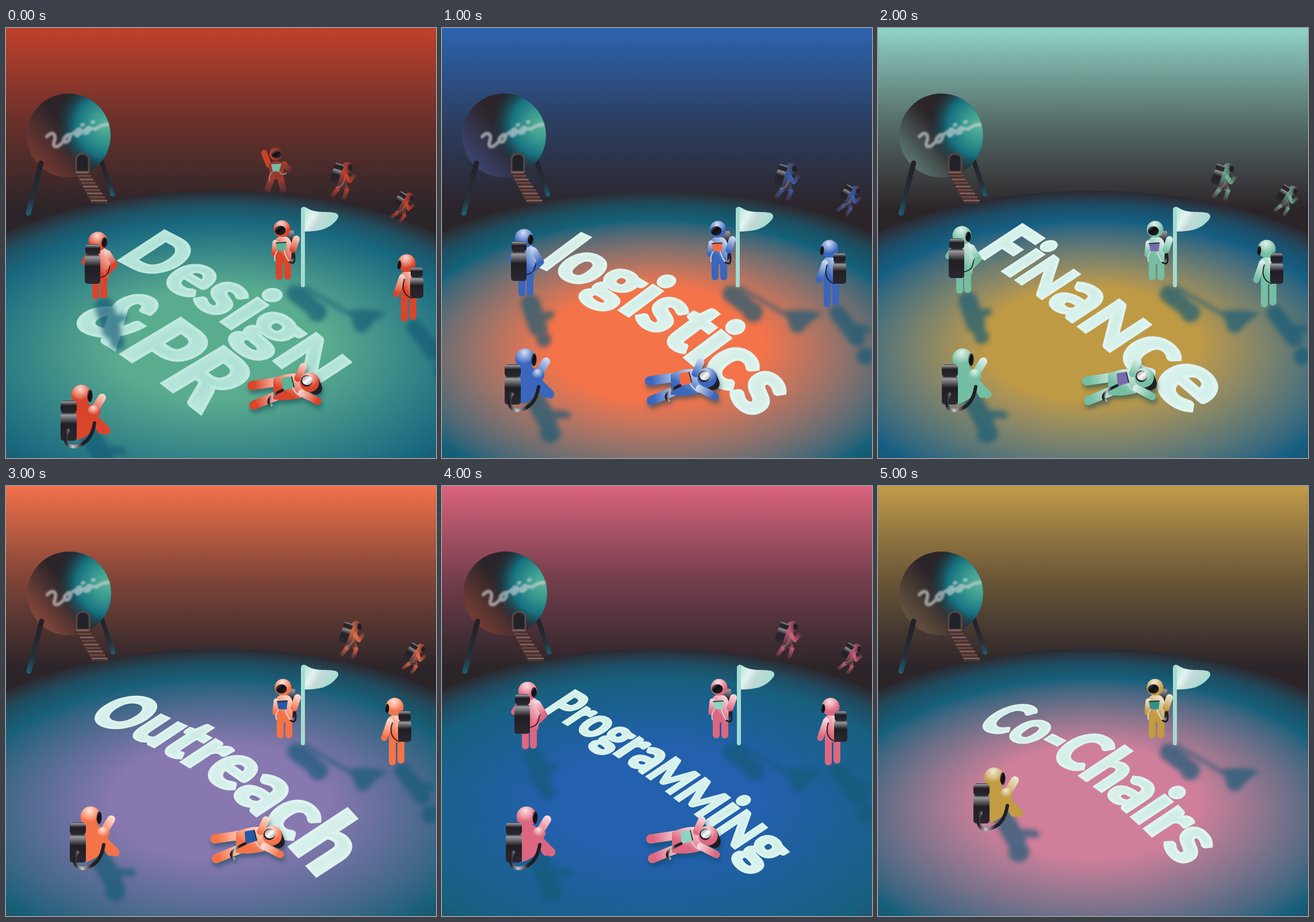
An HTML page that plays this animation: 748x748 px, repeating every 6 s.

```html
<!DOCTYPE html>
<html lang="en">
<head>
<meta charset="utf-8">
<title>Crew roles</title>
<style>
  html, body { margin: 0; height: 100%; overflow: hidden; background: #2b2429; }
  svg { display: block; width: 100vw; height: 100vh; }
  text { font: 900 100px Lato, "Open Sans", sans-serif; text-anchor: middle; stroke-width: 4; }
  .soft { filter: blur(4px); }
</style>
</head>
<body>
<svg id="stage" viewBox="0 0 748 748"></svg>
<script>
const STEP = 1000;
const DARK = '#2b2429';
const SHADE = '#145a76';

// Words: text, start, control and end of the baseline, cap-height vector, growth towards the end.
// Figures: offset from the usual place; a missing one is not on stage.
const scenes = [
  { sky: '#c1402a', ground: '#5aac8f', rim: '#17677f', suit: '#d9452b', panel: '#56b596', tint: '#7a3a32',
    glyph: ['#a9dfd2', '#bfe8de'], ship: [-1, 0], flag: [0, 0], holder: [-2, -1],
    back: [17, 5], right: [21, 25], sit: [-16, 63], lie: [65, 8], run: [[-16, -2], [-20, 12]], waver: [0, 0],
    words: [
      ['DesigN', [190, 402], [358, 482], [533, 636], [76, -50], 1.25],
      ['&', [108, 510], [148, 533], [188, 559], [106, -60], 1],
      ['PR', [193, 562], [268, 612], [338, 670], [100, -60], 1.06]] },
  { sky: '#2b64b0', ground: '#f57349', rim: '#13627a', suit: '#3a66bd', panel: '#f26a40', tint: '#3d4674',
    glyph: ['#d3ece6', '#dff4ef'], ship: [-2, 0], flag: [-2, 0], holder: [-2, 0],
    back: [0, 0], right: [-2, 0], sit: [-2, 0], lie: [-2, 0], run: [[-2, 0], [-2, 0]],
    words: [['logistics', [161, 411], [376, 508], [540, 683], [72, -54], 1.3]] },
  { sky: '#90d4c6', ground: '#bf9a45', rim: '#145f83', suit: '#74bfa4', panel: '#7a68ac', tint: '#5f7a74',
    glyph: ['#d0ede6', '#def4f0'], ship: [0, 0], flag: [0, 0], holder: [0, 0],
    back: [3, -5], right: [0, 0], sit: [0, 0], lie: [0, 0], run: [[0, 0], [0, 0]],
    words: [['FiNaNce', [167, 390], [325, 490], [538, 677], [76, -50], 1.3]] },
  { sky: '#f3714a', ground: '#8878b0', rim: '#17607a', suit: '#f47349', panel: '#2458a6', tint: '#8a4a3c',
    glyph: ['#cfebe5', '#def3ef'], ship: [0, 0], flag: [0, 0], holder: [0, 0],
    right: [0, 0], sit: [0, 0], lie: [0, 0], run: [[0, 0], [0, 0]],
    words: [['Outreach', [135, 406], [365, 474], [545, 684], [70, -46], 1.4]] },
  { sky: '#da637d', ground: '#2360ad', rim: '#17607f', suit: '#dc6781', panel: '#8fd3c5', tint: '#7a3f34',
    glyph: ['#d0eee7', '#dcf4ef'], ship: [0, 0], flag: [0, 0], holder: [0, 0],
    back: [6, -9], right: [0, 0], sit: [0, 0], lie: [0, 0], run: [[0, 0], [0, 0]],
    words: [['PrograMMiNg', [172, 390], [362, 490], [553, 671], [54, -36], 1.35]] },
  { sky: '#c19b49', ground: '#cf7f9a', rim: '#15607c', suit: '#c39b43', panel: '#2f9088', tint: '#6a5540',
    glyph: ['#cdebe4', '#def3ef'], ship: [0, 0], flag: [0, 0], holder: [0, 0], sit: [55, -68],
    words: [['Co-Chairs', [166, 419], [358, 470], [530, 665], [66, -44], 1.25]] }
];

const pen = document.createElement('canvas').getContext('2d');
pen.font = '900 100px Lato, "Open Sans", sans-serif';

const fill = id => `url(#${id})`;
const stops = list => list.map(([at, color, alpha = 1]) =>
  `<stop offset="${at}" style="stop-color:${color};stop-opacity:${alpha}"/>`).join('');
const linear = (id, dir, list) => {
  const [x1, y1, x2, y2] = dir;
  return `<linearGradient id="${id}" x1="${x1}" y1="${y1}" x2="${x2}" y2="${y2}">${stops(list)}</linearGradient>`;
};
const radial = (id, attrs, list) => `<radialGradient id="${id}" ${attrs}>${stops(list)}</radialGradient>`;
const circle = (x, y, r, paint) => `<circle cx="${x}" cy="${y}" r="${r}" fill="${paint}"/>`;
const oval = (x, y, rx, ry, paint) => `<ellipse cx="${x}" cy="${y}" rx="${rx}" ry="${ry}" fill="${paint}"/>`;
const box = (x, y, w, h, r, paint) =>
  `<rect x="${x}" y="${y}" width="${w}" height="${h}" rx="${r}" fill="${paint}"/>`;
const shape = (d, paint) => `<path d="${d}" fill="${paint}"/>`;
const line = (d, paint, w) =>
  `<path d="${d}" fill="none" stroke="${paint}" stroke-width="${w}" stroke-linecap="round"/>`;
const limb = (x1, y1, x2, y2, w, paint) => {
  const turn = Math.atan2(y2 - y1, x2 - x1) * 180 / Math.PI;
  return `<g transform="translate(${x1} ${y1}) rotate(${turn})">` +
    box(-w / 2, -w / 2, Math.hypot(x2 - x1, y2 - y1) + w, w, w / 2, paint) + '</g>';
};
const at = (offset, content, extra = '') =>
  offset ? `<g transform="translate(${offset})" ${extra}>${content}</g>` : '';

const SUIT = fill('suit'), ARM = fill('arm'), HEAD = fill('head'), PACK = fill('pack'),
  VISOR = fill('visor'), HOSE = fill('hose'), DIM = fill('dim'), INK = '#211e24';

function defs(s) {
  const pale = `color-mix(in srgb, ${s.suit} 20%, white)`;
  return '<defs>' +
    linear('sky', [0, 0, 0, 1], [[0, s.sky], [.5, `color-mix(in srgb, ${s.sky} 43%, ${DARK})`], [1, DARK]]) +
    radial('ground', 'gradientUnits="userSpaceOnUse" cx="0" cy="0" r="1" fx="0" fy="-.195" ' +
      'gradientTransform="translate(372 590) scale(578 307)"',
      [[0, s.ground], [.32, s.ground], [.79, s.rim], [.9, `color-mix(in srgb, ${s.rim} 68%, ${DARK})`], [1, '#2a2930']]) +
    linear('suit', [0, 0, 1, 0], [[0, s.suit], [1, s.suit]]) +
    linear('torso', [.1, 1, .8, 0], [[.35, s.suit], [1, pale]]) +
    linear('arm', [0, 0, 1, 0], [[0, pale], [.8, s.suit]]) +
    linear('reach', [0, 0, 1, 0], [[.1, s.suit], [1, pale]]) +
    linear('dim', [0, 0, 1, 0], [[0, s.suit], [1, '#4a3034']]) +
    radial('head', 'cx=".45" cy=".2" r=".75"', [[0, pale], [.75, s.suit]]) +
    linear('pack', [0, 0, 0, 1], [[0, INK], [.08, '#9a9a9e'], [.4, INK], [1, '#292831']]) +
    linear('visor', [0, 0, 1, 1], [[0, '#77757a'], [.4, '#0d0c0f'], [1, '#29262b']]) +
    linear('glass', [0, 0, 1, 1], [[0, '#777'], [.5, '#fff'], [1, '#999']]) +
    linear('hose', [0, 0, 1, 0], [[0, INK], [.25, '#c6c3c5'], [.6, INK], [1, INK]]) +
    linear('flag', [0, 0, 1, .4], [[0, '#a9dfd3'], [.4, '#e4f4f1'], [.6, '#c3d9d8'], [1, '#a5ddd0']]) +
    linear('shell', [0, .75, .6, .25], [[0, s.tint], [.75, DARK]]) +
    radial('lit', 'cx=".95" cy=".38" r=".62"', [[0, '#5db498'], [.3, '#37988f'], [.6, '#16707f'], [1, '#17303a', 0]]) +
    linear('strut', [0, 0, 1, 0], [[0, '#241f25'], [.7, '#25303b'], [1, '#1c6177']]) +
    radial('glyph', 'r=".65"', [[0, s.glyph[0]], [1, s.glyph[1]]]) +
    '</defs>';
}

// Sets each letter on a curved baseline lying on the ground; nearer letters are larger.
function word([text, a, c, b, up, grow], paint) {
  const letters = [...text].map((char, i) => {
    const size = i && /[NM]/.test(char) && text.length > 2 ? .78 : 1;
    return { char, size, width: pen.measureText(char).width * size };
  });
  const total = letters.reduce((sum, l) => sum + l.width, 0);
  const lag = (grow - 1) / (grow + 1);
  let x = 0;
  return letters.map(({ char, size, width }) => {
    const p = (x + width / 2) / total;
    x += width;
    const u = p - lag * p * (1 - p), v = 1 - u;
    const pace = (1 - lag + 2 * lag * p) / total;
    const spot = [0, 1].map(k => v * v * a[k] + 2 * u * v * c[k] + u * u * b[k]);
    const along = [0, 1].map(k => 2 * (v * (c[k] - a[k]) + u * (b[k] - c[k])) * pace);
    const down = up.map(k => -k * (1 + (grow - 1) * u) / 72);
    return `<text transform="matrix(${[...along, ...down, ...spot]}) scale(${size})" ` +
      `fill="url(#glyph)" stroke="${paint}">${char === '&' ? '&amp;' : char}</text>`;
  }).join('');
}

function ship() {
  let steps = '';
  for (let i = 0; i < 9; i++) {
    const x = 122 + i * 3.3, y = 250 + i * 6.1, w = 23 + i * .7;
    steps += box(x, y, w, 6, 0, '#4a3233') + box(x, y, w, 2.5, 1, i % 2 ? '#6f4b43' : '#84665a');
  }
  return limb(167, 232, 186, 289, 8, fill('strut')) +
    circle(110, 187, 73, fill('shell')) + circle(110, 187, 73, fill('lit')) +
    limb(62, 235, 40, 322, 9, fill('strut')) +
    '<g style="filter:blur(1.5px)" opacity=".65">' +
    line('M72 189C82 178 89 185 85 197Q81 208 91 206Q101 200 104 190Q110 182 113 188Q110 201 102 198' +
      'Q99 189 112 186Q124 180 126 176Q132 174 131 182Q124 192 122 184Q126 176 137 180Q145 170 147 174' +
      'Q145 184 139 183Q147 172 157 176Q166 168 177 168M133 169l2 -1M151 164l2 -1', '#cbd3d5', 6) + '</g>' +
    `<path d="M123 250V230Q123 219 134 219T145 230V250Z" fill="#202329" stroke="#5d4442" stroke-width="3"/>` + steps;
}

const flag = () =>
  shape('M513 317Q515 307 525 314C540 323 560 318 574 322Q581 326 576 333C562 350 546 354 519 354Z', fill('flag')) +
  box(513, 312, 7, 139, 3.5, '#a4dbd0');

const shades = {
  holder: () => limb(505, 463, 530, 482, 30, SHADE) + circle(543, 495, 17, SHADE) +
    limb(520, 451, 607, 503, 6, SHADE) + shape('M592 494Q630 486 664 497Q642 509 630 527Q608 541 603 503Z', SHADE),
  back: () => limb(154, 480, 167, 520, 33, SHADE) + limb(170, 503, 188, 499, 14, SHADE) + circle(177, 542, 13, SHADE),
  right: () => limb(690, 496, 724, 540, 28, SHADE) + limb(722, 520, 742, 525, 12, SHADE) + circle(738, 571, 15, SHADE),
  sit: () => limb(160, 640, 185, 684, 34, SHADE) + limb(190, 671, 219, 673, 13, SHADE) + circle(190, 704, 18, SHADE)
};

const back = () =>
  limb(139, 425, 139, 461, 12, SUIT) + limb(153, 425, 153, 460, 12, SUIT) +
  limb(128, 388, 119, 402, 10, SUIT) +
  shape('M130 394Q130 377 147 376Q163 378 165 395L161 433H132Z', fill('torso')) +
  limb(160, 387, 172, 407, 11, ARM) + limb(172, 408, 161, 419, 9, SUIT) +
  circle(143, 366, 16.5, HEAD) + oval(154, 368, 5, 9, VISOR) +
  line('M146 429Q163 427 163 409', INK, 1.6) +
  box(121, 371, 26, 18, 5, PACK) + box(120, 389, 27, 51, 5, PACK);

const holder = s =>
  box(487, 350, 16, 54, 6, PACK) +
  limb(477, 404, 477, 433, 12, SUIT) + limb(492, 404, 492, 433, 12, SUIT) +
  shape('M469 376Q470 363 483 363Q497 363 499 378L498 411H471Z', fill('torso')) +
  limb(470, 374, 468, 394, 9, ARM) + limb(501, 386, 507, 368, 12, fill('reach')) +
  circle(482, 350, 14.5, HEAD) + oval(479, 353, 9.5, 8, VISOR) +
  shape('M471 374L490 373L488 389L474 388Z', s.panel) + line('M472 375L489 374', INK, 1.5) +
  line('M474 389Q468 396 470 406', '#dcd8d8', 1.8) + line('M486 389Q489 401 497 410', '#dcd8d8', 1.8) +
  line('M495 408Q507 415 503 393', INK, 3);

const right = () =>
  limb(672, 440, 672, 480, 12, SUIT) + limb(687, 440, 687, 477, 12, SUIT) +
  shape('M663 410Q664 399 677 398Q690 400 692 413L691 446H667Z', fill('torso')) +
  limb(668, 409, 658, 438, 11, ARM) +
  circle(676, 384, 15.5, HEAD) + oval(663, 387, 3.5, 8, VISOR) +
  line('M672 412Q664 436 684 445', INK, 1.8) +
  box(683, 391, 21, 18, 5, PACK) + box(682, 408, 23, 37, 5, PACK);

const sit = () =>
  limb(170, 617, 190, 637, 15, SUIT) + limb(168, 615, 181, 637, 13, SUIT) +
  shape('M132 597Q140 585 160 590Q173 600 171 631Q160 649 139 654Z', SUIT) +
  limb(169, 603, 183, 580, 14, fill('reach')) + circle(169, 604, 11, HEAD) +
  circle(147, 575, 17.5, HEAD) + oval(162, 577, 4.5, 11, VISOR) +
  box(111, 585, 28, 22, 6, PACK) + box(111, 606, 28, 49, 5, PACK) +
  line('M124 637C116 648 118 667 136 665C157 661 167 645 170 624', HOSE, 6);

const lie = s =>
  limb(469, 606, 474, 619, 22, INK) +
  limb(410, 607, 363, 614, 16, ARM) + limb(410, 630, 366, 648, 16, ARM) +
  shape('M400 602Q426 590 447 594Q458 615 449 635Q424 642 400 638Z', fill('torso')) +
  limb(443, 601, 452, 581, 13, fill('reach')) + limb(450, 627, 477, 641, 13, ARM) +
  circle(463, 608, 17, HEAD) + oval(458, 606, 10, 10, INK) + oval(459, 605, 9, 8, fill('glass')) +
  shape('M415 601L432 598L437 617L417 623Z', s.panel) + line('M432 599L436 616', INK, 1.5) +
  line('M416 622C395 631 386 641 396 648', HOSE, 5) + line('M434 619Q439 628 448 633', '#dcd8d8', 2);

const runner = () =>
  limb(0, 7, -8, 16, 9, DIM) + limb(-8, 16, -16, 26, 7, DIM) + limb(4, 7, 9, 17, 9, DIM) + limb(9, 17, 4, 30, 7, DIM) +
  limb(3, -10, 1, 6, 16, DIM) + limb(7, -8, 14, 1, 7, SUIT) + limb(14, 1, 22, -9, 7, DIM) +
  circle(10, -23, 9.5, DIM) + oval(15, -22, 4, 6, INK) +
  `<g transform="rotate(18)">${box(-20, -27, 16, 11, 4, PACK)}${box(-20, -17, 15, 26, 4, PACK)}</g>` +
  line('M-10 12Q2 13 5 -3', '#8b8588', 1.5);

const waver = s =>
  limb(463, 258, 455, 281, 11, DIM) + limb(477, 258, 482, 281, 11, DIM) +
  limb(457, 238, 449, 217, 10, SUIT) + limb(484, 237, 493, 246, 10, DIM) +
  shape('M457 237Q470 227 485 236L482 263H459Z', '#a03c2d') +
  circle(470, 219, 11.5, DIM) + oval(470, 220, 8.5, 6, VISOR) +
  shape('M461 237L479 236L475 250L464 249Z', '#7dcbb2') +
  line('M464 250Q456 257 459 265M476 250Q480 258 488 252', '#a99a98', 1.6);

function draw(s) {
  const cast = Object.keys(shades).map(name => at(s[name], shades[name]())).join('');
  const runners = (s.run || []).map((p, i) => {
    const [x, y, scale, turn] = i ? [709, 299, .84, 14] : [600, 267, 1, 0];
    return at([x + p[0], y + p[1]], `<g transform="scale(${scale}) rotate(${turn})">${runner()}</g>`, 'opacity=".88"');
  }).join('');
  return defs(s) + box(0, 0, 748, 318, 0, fill('sky')) + box(0, 317, 748, 431, 0, DARK) +
    oval(372, 590, 578, 307, fill('ground')) +
    at(s.ship, ship()) + at(s.waver, waver(s), 'opacity=".9"') + runners +
    s.words.map(w => word(w, s.glyph[1])).join('') +
    `<g class="soft" opacity=".68">${cast}</g>` +
    at(s.holder, holder(s)) + at(s.flag, flag()) +
    at(s.back, back()) + at(s.right, right()) + at(s.sit, sit()) +
    at(s.lie, lie(s), 'style="filter:drop-shadow(2px 6px 4px #0b485c99)"');
}

const stage = document.getElementById('stage');
const pictures = scenes.map(draw);
let shown = -1;

function tick(now) {
  const index = Math.floor(now / STEP) % pictures.length;
  if (index !== shown) stage.innerHTML = pictures[shown = index];
  requestAnimationFrame(tick);
}
tick(performance.now());
</script>
</body>
</html>
```
